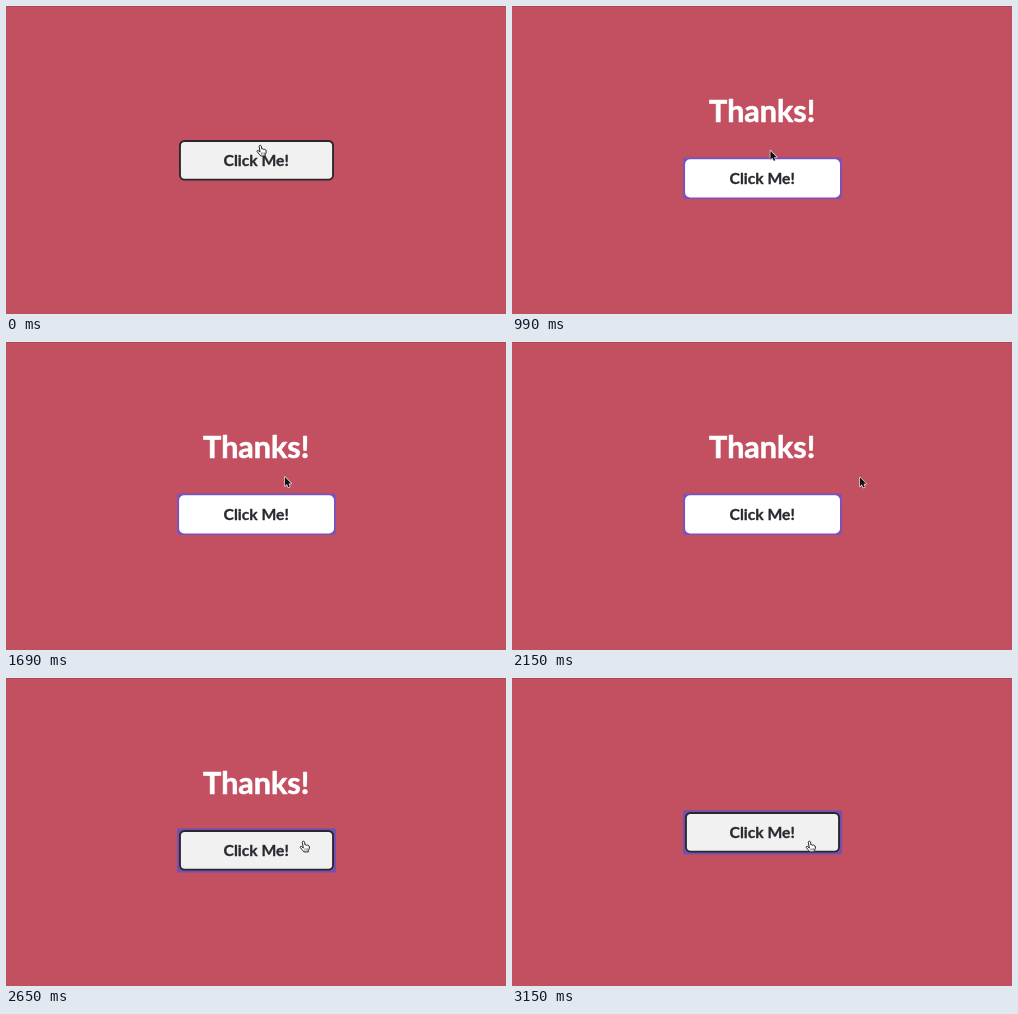
These frames come from a looping animation (500x308 px, 3.18 s). An HTML page with a canvas:

```html
<!DOCTYPE html>
<html lang="en">
<head>
<meta charset="utf-8">
<title>Click Me</title>
<style>
html, body { margin: 0; width: 100%; height: 100%; overflow: hidden; background: #c25060; }
canvas { display: block; width: 500px; height: 308px; }
</style>
</head>
<body>
<canvas id="stage"></canvas>
<script>
const LOOP = 3180;
const PRESS = 850, SHOW = 920, HIDE = 3000;
const W = 500, H = 308;

// Pointer tip over time: [ms, x, y]
const PATH = [
  [0, 254.3, 139.4], [30, 254.3, 139.4], [450, 258.4, 145], [1350, 258.4, 144.4],
  [1690, 278.7, 135], [1830, 330, 132], [1980, 366, 127], [2150, 348, 135.3],
  [2350, 318, 152], [2520, 297.5, 163.3], [LOOP, 297.5, 163.3]
];

const canvas = document.getElementById('stage');
const ctx = canvas.getContext('2d');
const ratio = window.devicePixelRatio || 1;
canvas.width = W * ratio;
canvas.height = H * ratio;

const arrowShape = new Path2D('M0 0V9L2 7.1L3.4 10.2L4.9 9.6L3.6 6.5H6.3Z');
const handShape = new Path2D(
  'M-1.2 1C-1.2 -.4 .8 -.5 1 .8L1.6 3.7Q2.4 3 3.1 3.9Q4 3.3 4.6 4.3' +
  'Q5.8 4.1 5.9 5.6Q6.1 7.6 4.8 9.3V10.6H.4Q-.2 9.6 -1.4 8.5L-3.2 6.2' +
  'Q-3.4 4.6 -2 5.2L-.2 6.7Z'
);

function pointerAt(t) {
  let i = 1;
  while (i < PATH.length - 1 && t > PATH[i][0]) i++;
  const [t0, x0, y0] = PATH[i - 1];
  const [t1, x1, y1] = PATH[i];
  const p = (t - t0) / (t1 - t0);
  const k = p * p * (3 - 2 * p) * 0.4 + p * 0.6;
  return { x: x0 + (x1 - x0) * k, y: y0 + (y1 - y0) * k };
}

function box(x, y, w, h, r, color) {
  ctx.beginPath();
  ctx.roundRect(x, y, w, h, r);
  ctx.fillStyle = color;
  ctx.fill();
}

// A thin stroke gives the slightly heavy look of smoothed bold type
function label(text, y, size, color) {
  ctx.font = `700 ${size}px Lato, sans-serif`;
  ctx.textAlign = 'center';
  ctx.textBaseline = 'alphabetic';
  ctx.lineJoin = 'round';
  ctx.lineWidth = size * 0.02;
  ctx.fillStyle = ctx.strokeStyle = color;
  ctx.fillText(text, 250.2, y);
  ctx.strokeText(text, 250.2, y);
}

function drawButton(top, hover, focus) {
  if (hover) {
    if (focus) box(171, top - 1.8, 159, 44.2, 1.5, '#7450ac');
    box(173, top, 155, 40.6, 5.5, '#29262d');
    box(174.9, top + 1.9, 151.2, 36.8, 3.8, '#f1f1f1');
  } else {
    if (focus) box(171.2, top - 0.6, 158.6, 41.6, 3, '#7852bd');
    box(173.1, top + 1.2, 154.9, 38.2, 5, '#ffffff');
  }
  label('Click Me!', top + 26.1, 15.7, '#2b2930');
}

function drawPointer(p, hand) {
  const shape = hand ? handShape : arrowShape;
  ctx.save();
  ctx.translate(p.x, p.y);
  ctx.lineJoin = 'round';
  ctx.lineWidth = hand ? 1 : 1.3;
  ctx.fillStyle = hand ? '#fff' : '#111';
  ctx.strokeStyle = hand ? '#222' : '#eee';
  if (hand) {
    ctx.fill(shape);
    ctx.stroke(shape);
    ctx.lineWidth = 0.5;
    ctx.beginPath();
    for (const x of [1.3, 2.7, 4.1]) {
      ctx.moveTo(x, 7);
      ctx.lineTo(x, 9.3);
    }
    ctx.stroke();
  } else {
    ctx.stroke(shape);
    ctx.fill(shape);
  }
  ctx.restore();
}

function draw(t) {
  const thanks = t >= SHOW && t < HIDE;
  const top = thanks ? 152 : 134;
  const p = pointerAt(t);
  const hover = p.x >= 173 && p.x <= 328 && p.y >= top && p.y <= top + 41;

  ctx.setTransform(ratio, 0, 0, ratio, 0, 0);
  ctx.fillStyle = '#c25060';
  ctx.fillRect(0, 0, W, H);
  ctx.fillStyle = '#a94858';
  ctx.fillRect(0, 0, W, 1);

  if (thanks) label('Thanks!', 116.1, 30.5, '#fff');
  drawButton(top, hover, t >= PRESS);
  drawPointer(p, hover);
}

const start = performance.now();
function tick() {
  draw((performance.now() - start) % LOOP);
  requestAnimationFrame(tick);
}
tick();
</script>
</body>
</html>
```
